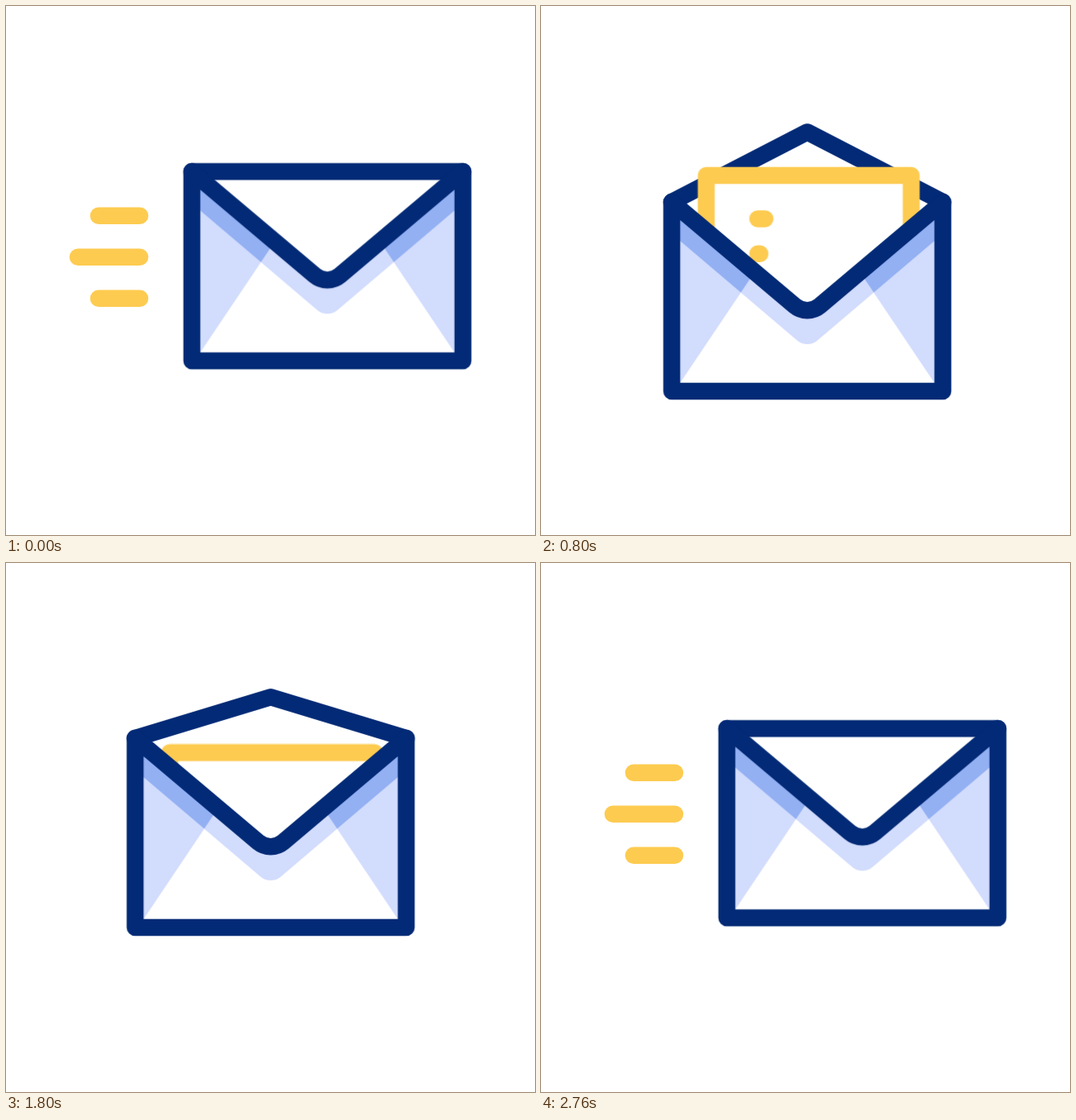
Write an HTML page that moves like this. It is 640 px wide and 640 px high and loops after 3 s.

```html
<!DOCTYPE html>
<html lang="en">
<head>
<meta charset="utf-8">
<title>Envelope</title>
<style>
  :root { --navy: #032a76; --yellow: #fdcb50; --light: #d2dcfd; --mid: #93b0f3; }
  html, body { margin: 0; width: 100%; height: 100%; overflow: hidden; background: #fff; }
  svg { display: block; width: 100%; height: 100%; }

  .line { fill: none; stroke: var(--navy); stroke-width: 20.5; stroke-linejoin: round; stroke-linecap: round; }
  .yellow { stroke: var(--yellow); }
  .trim { stroke-dasharray: 100 300; }

  .env, .flap, .letter, .speed, .trim { animation: 3s linear infinite; }
  .env { animation-name: travel; }
  .flap { animation-name: flap; }
  .letter { animation-name: letter; }
  .speed { animation-name: drift; }
  .outer { animation-name: outer; }
  .inner { animation-name: inner; }
  .text1 { animation-name: text1; }
  .text2 { animation-name: text2; }

  @keyframes travel {
    0%, 5.333% { transform: translate(388.8px, 429.3px); animation-timing-function: cubic-bezier(.5, 0, .75, .4); }
    13.333% { transform: translate(379px, 434.3px); animation-timing-function: cubic-bezier(.33, .18, .67, .85); }
    22.667% { transform: translate(328.5px, 464px); animation-timing-function: cubic-bezier(.33, .5, .67, .83); }
    26.667% { transform: translate(322.2px, 466px); animation-timing-function: cubic-bezier(.15, .5, .4, 1); }
    41.333% { transform: translate(319px, 469px); animation-timing-function: cubic-bezier(.6, 0, .9, .4); }
    53.333% { transform: translate(319.6px, 466px); animation-timing-function: cubic-bezier(.33, .13, .67, .67); }
    60% { transform: translate(320.2px, 441px); animation-timing-function: cubic-bezier(.25, .55, .5, 1); }
    66.667% { transform: translate(320.2px, 430px); animation-timing-function: cubic-bezier(.6, 0, .85, .5); }
    78.667% { transform: translate(349.5px, 429.5px); }
    81.333% { transform: translate(372.8px, 429.3px); animation-timing-function: cubic-bezier(.1, .5, .3, 1); }
    92%, 100% { transform: translate(388.8px, 429.3px); }
  }
  @keyframes flap {
    0%, 5.333% { d: path("M-164 -229L0 -229L164 -229"); animation-timing-function: cubic-bezier(.6, 0, .85, .4); }
    13.333% { d: path("M-164 -229L0 -233.5L164 -229"); animation-timing-function: cubic-bezier(.33, .12, .67, .85); }
    22.667% { d: path("M-164 -229L0 -304.5L164 -229"); animation-timing-function: cubic-bezier(.33, .5, .67, .83); }
    26.667% { d: path("M-164 -229L0 -313.5L164 -229"); animation-timing-function: cubic-bezier(.15, .5, .4, 1); }
    41.333% { d: path("M-164 -229L0 -320.5L164 -229"); animation-timing-function: cubic-bezier(.6, 0, .9, .4); }
    53.333% { d: path("M-164 -229L0 -315L164 -229"); animation-timing-function: cubic-bezier(.33, .13, .67, .67); }
    60% { d: path("M-164 -229L0 -279L164 -229"); animation-timing-function: cubic-bezier(.33, .4, .67, .85); }
    66.667% { d: path("M-164 -229L0 -239L164 -229"); animation-timing-function: cubic-bezier(.25, .5, .5, 1); }
    74.667%, 100% { d: path("M-164 -229L0 -229L164 -229"); }
  }
  @keyframes letter {
    0%, 10.667% { transform: translate(1.7px, -85px); animation-timing-function: cubic-bezier(.4, 0, .67, .93); }
    26.667% { transform: translate(1.7px, -261px); animation-timing-function: cubic-bezier(.15, .5, .4, 1); }
    41.333% { transform: translate(1.7px, -275px); animation-timing-function: cubic-bezier(.6, 0, .9, .4); }
    53.333% { transform: translate(1.7px, -272px); animation-timing-function: cubic-bezier(.4, .05, .67, .8); }
    66.667% { transform: translate(1.7px, -125px); animation-timing-function: cubic-bezier(.25, .5, .5, 1); }
    74.667%, 100% { transform: translate(1.7px, -85px); }
  }
  @keyframes drift {
    0%, 5.333% { transform: none; animation-timing-function: cubic-bezier(.8, 0, 1, .2); }
    21.333%, 70% { transform: translateX(-30px); animation-timing-function: step-end; }
    70.01%, 100% { transform: none; }
  }
  @keyframes outer {
    0%, 8% { stroke-dashoffset: 0; animation-timing-function: ease-in-out; }
    22% { stroke-dashoffset: 101; }
    75.333% { stroke-dashoffset: 101; animation-timing-function: cubic-bezier(.2, .6, .2, 1); }
    92%, 100% { stroke-dashoffset: 0; }
  }
  @keyframes inner {
    0%, 5.333% { stroke-dashoffset: 0; animation-timing-function: ease-in-out; }
    20.5% { stroke-dashoffset: 101; }
    76.667% { stroke-dashoffset: 101; animation-timing-function: cubic-bezier(.2, .6, .2, 1); }
    92%, 100% { stroke-dashoffset: 0; }
  }
  @keyframes text1 {
    0%, 24% { stroke-dashoffset: 101; animation-timing-function: ease-in-out; }
    37.333%, 49.333% { stroke-dashoffset: 0; animation-timing-function: ease-in-out; }
    60%, 100% { stroke-dashoffset: -101; }
  }
  @keyframes text2 {
    0%, 25% { stroke-dashoffset: 101; animation-timing-function: ease-in-out; }
    38.333%, 48% { stroke-dashoffset: 0; animation-timing-function: ease-in-out; }
    58.667%, 100% { stroke-dashoffset: -101; }
  }
</style>
</head>
<body>
<svg viewBox="0 0 640 640">
  <defs>
    <clipPath id="pocket"><path d="M-174-400H174V-5H-174Z"/></clipPath>
    <path id="front" d="M-164-229V0H164V-229L15.2-103.3A23.6 23.6 0 0 1-15.2-103.3Z"/>
    <g id="side">
      <path fill="var(--light)" d="M-164-229V5L-63.7-144.3Z"/>
      <path fill="var(--mid)" d="M-164-229L-63.7-144.3L-80.4-119.5L-164-190.5Z"/>
    </g>
  </defs>

  <g class="speed">
    <path class="line yellow trim outer" pathLength="100" d="M112 253.7H162"/>
    <path class="line yellow trim inner" pathLength="100" d="M87 303.8H162"/>
    <path class="line yellow trim outer" pathLength="100" d="M112 353.8H162"/>
  </g>

  <!-- Origin: middle of the envelope's bottom edge -->
  <g class="env">
    <path class="line flap" d="M-164-229L0-229L164-229"/>
    <g clip-path="url(#pocket)">
      <g class="letter">
        <path class="line yellow" style="fill:#fff" d="M-124 200V0H124V200"/>
        <path class="line yellow trim text1" pathLength="100" d="M-61.7 52.4H55.8"/>
        <path class="line yellow trim text2" pathLength="100" d="M-61.7 94.8H55.8"/>
      </g>
    </g>
    <use href="#front" fill="#fff"/>
    <path fill="var(--light)" d="M-164-229L0-95L164-229V-190.5L12.3-61.6A19 19 0 0 1-12.3-61.6L-164-190.5Z"/>
    <use href="#side"/>
    <use href="#side" transform="scale(-1 1)"/>
    <use href="#front" class="line"/>
  </g>
</svg>
</body>
</html>
```
